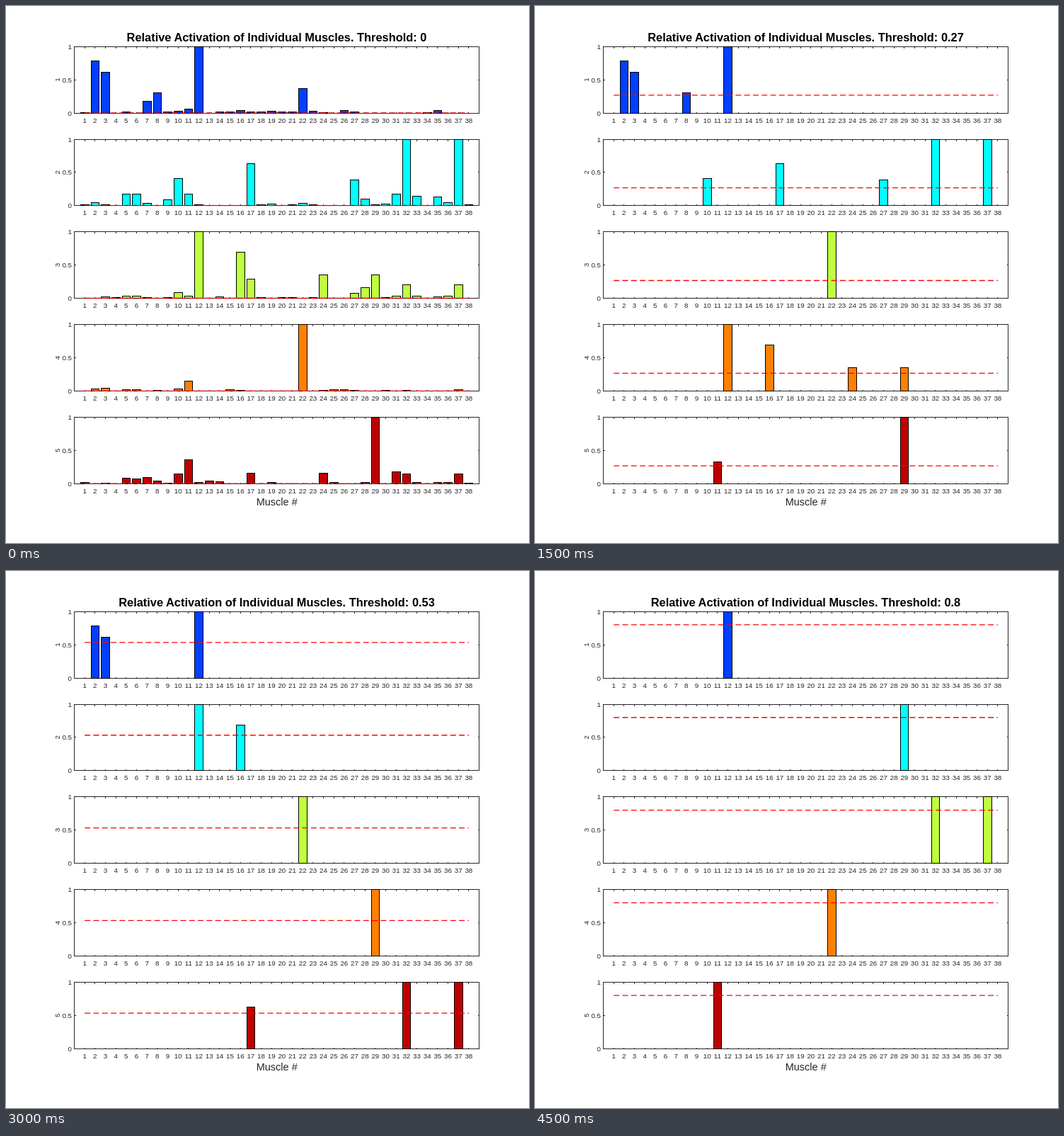
These frames come from a looping animation (739x758 px, 5 s). An HTML page:

```html
<!DOCTYPE html>
<html lang="en">
<head>
<meta charset="utf-8">
<title>Muscle activation</title>
<style>
html, body { margin: 0; width: 100%; height: 100%; overflow: hidden; background: #fff; }
svg { display: block; font-family: "Liberation Sans", Arial, sans-serif; font-size: 9.8px; fill: #262626; }
.axis { fill: none; stroke: #262626; shape-rendering: crispEdges; }
.bars { stroke: #000; shape-rendering: crispEdges; }
.limit { stroke: #f00; stroke-width: 1.3; stroke-dasharray: 8 4.3; }
</style>
</head>
<body>
<svg id="stage" width="739" height="758" viewBox="0 0 739 758"></svg>
<script>
const COLORS = ['#0040ff', '#00ffff', '#bfff40', '#ff8000', '#bf0000'];
const MUSCLES = 38, STEP_MS = 500, MAX_THRESHOLD = .8;
const LEFT = 96.5, RIGHT = 668.5, HEIGHT = 93.7, TICK = 2;
const UNIT = (RIGHT - LEFT) / (MUSCLES + 1);

// Muscle groups that act together: muscle number -> activation
const groups = {
  A: { 2: .78, 3: .61, 7: .175, 8: .3, 12: 1 },
  B: { 11: .145, 22: 1 },
  C: { 12: 1, 16: .69, 17: .16, 24: .355, 28: .14, 29: .355 },
  D: { 5: .06, 6: .05, 7: .09, 10: .08, 11: .33, 17: .06, 24: .16, 27: -.2, 29: 1, 31: .15 },
  E: { 5: .17, 6: .17, 9: .085, 10: .41, 11: .175, 17: .63, 27: .385, 28: .1,
       31: .175, 32: 1, 33: .14, 35: .13, 37: 1 },
  F: { 11: 1 }
};

// Each step: one weighted mix of groups per panel
const steps = [
  'A+.37B E C+.2E B D+.15E',
  'B C C+.37E-.4D 1.08A+.37B D+.5E',
  'A D B C E',
  'A E B C D',
  'E A B C D',
  'A C B D E',
  'A C B D E',
  'A E B C D',
  'A 1.16E D C B',
  'A D E B F'
].map(line => line.split(' '));

const stage = document.getElementById('stage');
const xOf = n => LEFT + UNIT * n;
const crisp = v => Math.floor(v + .1) + .5;

function seeded(seed) {
  return () => (seed = seed * 16807 % 2147483647) / 2147483647;
}

function mixGroups(mix) {
  const levels = Array(MUSCLES + 1).fill(0);
  for (const [, weight, key] of mix.matchAll(/([-+]?[.\d]*)([A-F])/g)) {
    for (const id in groups[key]) levels[id] += (weight ? +weight : 1) * groups[key][id];
  }
  return levels;
}

// Faint residue on idle muscles, visible only without a threshold
function addResidue(levels, row) {
  const random = seeded(4001 + 977 * row);
  return levels.map((level, id) => {
    const active = random() < .45, residue = .01 + .035 * random() ** 2;
    return id && !level && active ? residue : level;
  });
}

function add(tag, attrs, text = '') {
  const el = document.createElementNS('http://www.w3.org/2000/svg', tag);
  for (const key in attrs) el.setAttribute(key, attrs[key]);
  el.textContent = text;
  return stage.appendChild(el);
}

function label(text, x, y, attrs) {
  return add('text', { x, y, 'text-anchor': 'middle', ...attrs }, text);
}

function buildPanel(color, row) {
  const base = 57.2 + 130.8 * row + HEIGHT;
  const yOf = value => base - value * HEIGHT;
  const top = crisp(yOf(1)), middle = crisp(yOf(.5)), bottom = crisp(base);
  let axis = `M${LEFT} ${top}H${RIGHT}V${bottom}H${LEFT}Z` +
    `M${LEFT} ${middle}h${TICK}M${RIGHT} ${middle}h${-TICK}`;
  for (let n = 1; n <= MUSCLES; n++) {
    const x = crisp(xOf(n));
    axis += `M${x} ${top}v${TICK}M${x} ${bottom}v${-TICK}`;
    label(n, xOf(n), bottom + 13.6);
  }
  add('path', { d: axis, class: 'axis' });
  for (const value of [0, .5, 1]) {
    label(value, 93, yOf(value) + 3.6, { 'text-anchor': 'end' });
  }
  label(row + 1, 0, 0, { transform: `translate(76.3 ${yOf(.5)}) rotate(-90)` });
  return {
    yOf,
    bars: add('path', { class: 'bars', fill: color }),
    limit: add('path', { class: 'limit' })
  };
}

const title = label('', 382.5, 50, { 'font-size': 16.4, 'font-weight': 700, fill: '#000' });
const panels = COLORS.map(buildPanel);
label('Muscle #', 382.7, 705, { 'font-size': 14.5 });

function barPath(id, level, yOf) {
  const half = UNIT * .4;
  const x1 = crisp(xOf(id) - half), x2 = crisp(xOf(id) + half);
  const bottom = crisp(yOf(0)), top = crisp(yOf(Math.min(level, 1)));
  return `M${x1} ${bottom}V${top}H${x2}V${bottom}Z`;
}

function draw(step) {
  const threshold = MAX_THRESHOLD * step / (steps.length - 1);
  title.textContent = 'Relative Activation of Individual Muscles. Threshold: ' + +threshold.toFixed(2);
  panels.forEach(({ yOf, bars, limit }, row) => {
    let levels = mixGroups(steps[step][row]);
    if (!threshold) levels = addResidue(levels, row);
    bars.setAttribute('d', levels.map((level, id) =>
      level > threshold ? barPath(id, level, yOf) : '').join(''));
    limit.setAttribute('d', `M${xOf(1)} ${yOf(threshold)}H${xOf(MUSCLES)}`);
  });
}

let shown = 0, start;
function tick(now) {
  start ??= now;
  const step = Math.floor((now - start) / STEP_MS) % steps.length;
  if (step !== shown) draw(shown = step);
  requestAnimationFrame(tick);
}
draw(shown);
requestAnimationFrame(tick);
</script>
</body>
</html>
```
